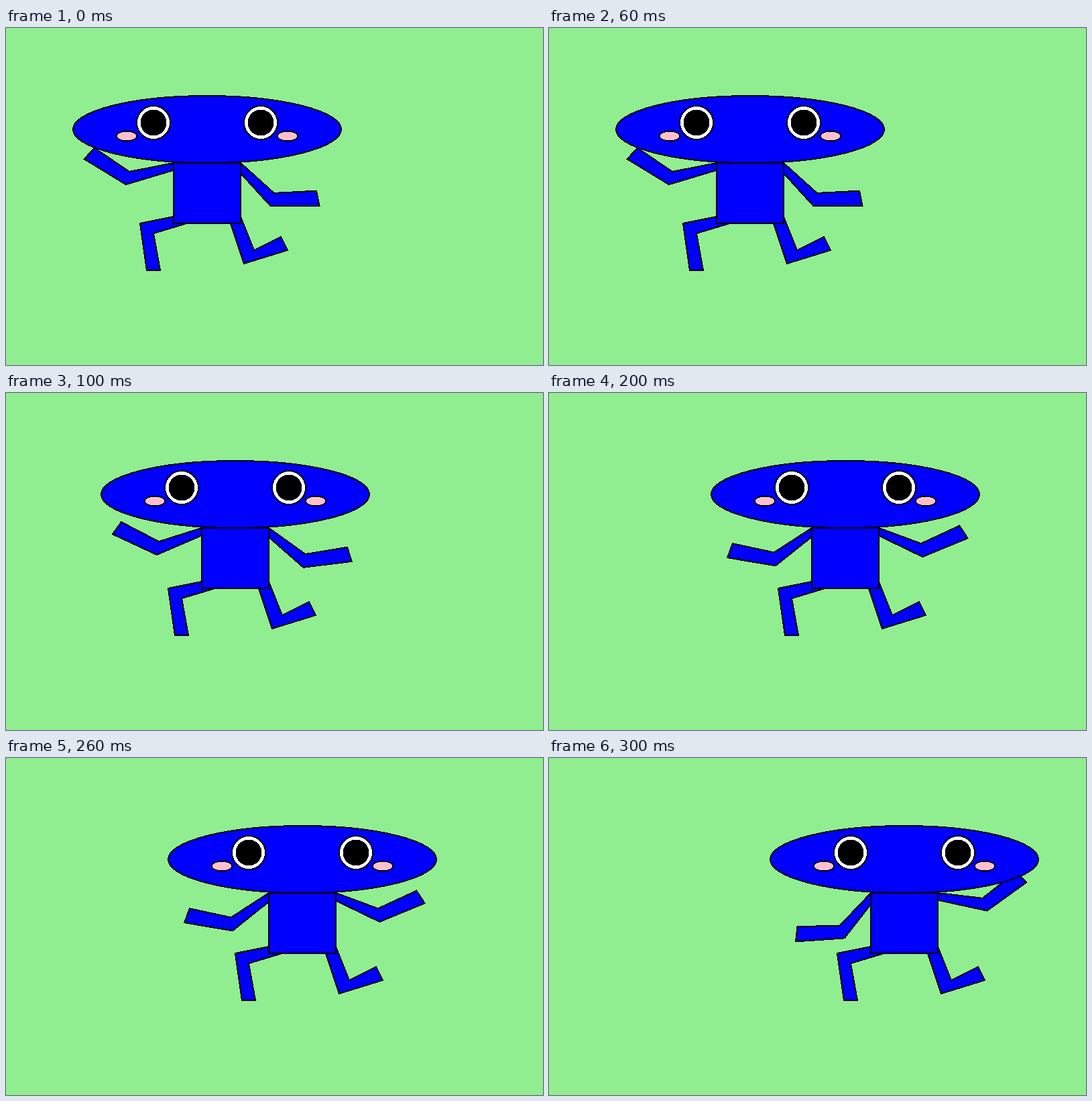
Recreate the animation shown at these times as an HTML page. Size 801x502 px, loop 0.4 s.

```html
<!DOCTYPE html>
<html lang="en">
<head>
<meta charset="utf-8">
<title>Running figure</title>
<style>
  html, body { margin: 0; width: 100%; height: 100%; overflow: hidden; background: lightgreen; }
  svg { display: block; }
  .skin { fill: blue; }
</style>
</head>
<body>
<svg width="801" height="502" viewBox="0 0 801 502" shape-rendering="crispEdges">
  <defs>
    <polygon id="arm" points="0,0 60,30 120,10 130,30 60,50 -10,6"/>
    <g id="eye">
      <circle r="25" fill="white"/>
      <circle r="19.5" fill="black" stroke="none"/>
    </g>
    <ellipse id="cheek" rx="15" ry="7.5" fill="pink"/>
  </defs>
  <g id="figure" stroke="black" stroke-width="2">
    <g class="skin">
      <g transform="translate(250 201)"><g class="swing"><use href="#arm" transform="scale(-1 1)"/></g></g>
      <g transform="translate(350 201)"><g class="swing"><use href="#arm"/></g></g>
      <polygon points="250,281 200,291 210,361 230,361 220,306 270,291"/>
      <polygon points="350,281 370,331 410,311 420,331 355,351 335,291"/>
      <rect x="250" y="201" width="100" height="90"/>
      <ellipse cx="300" cy="151" rx="200" ry="50"/>
    </g>
    <use href="#eye" x="220" y="141"/>
    <use href="#eye" x="380" y="141"/>
    <use href="#cheek" x="180" y="161"/>
    <use href="#cheek" x="420" y="161"/>
  </g>
</svg>
<script>
  const STEP = 100;
  const SHIFTS = [0, 42, 142, 230];
  const figure = document.getElementById('figure');
  const arms = document.querySelectorAll('.swing');

  // The arms turn in proportion to the distance run.
  const armAngle = shift => 15.45 - 0.1536 * shift;

  function draw(time) {
    const shift = SHIFTS[Math.floor(time / STEP) % SHIFTS.length];
    figure.setAttribute('transform', `translate(${shift} 0)`);
    for (const arm of arms) arm.setAttribute('transform', `rotate(${armAngle(shift)})`);
  }

  const start = performance.now();
  function tick() {
    draw(performance.now() - start);
    requestAnimationFrame(tick);
  }
  tick();
</script>
</body>
</html>
```
